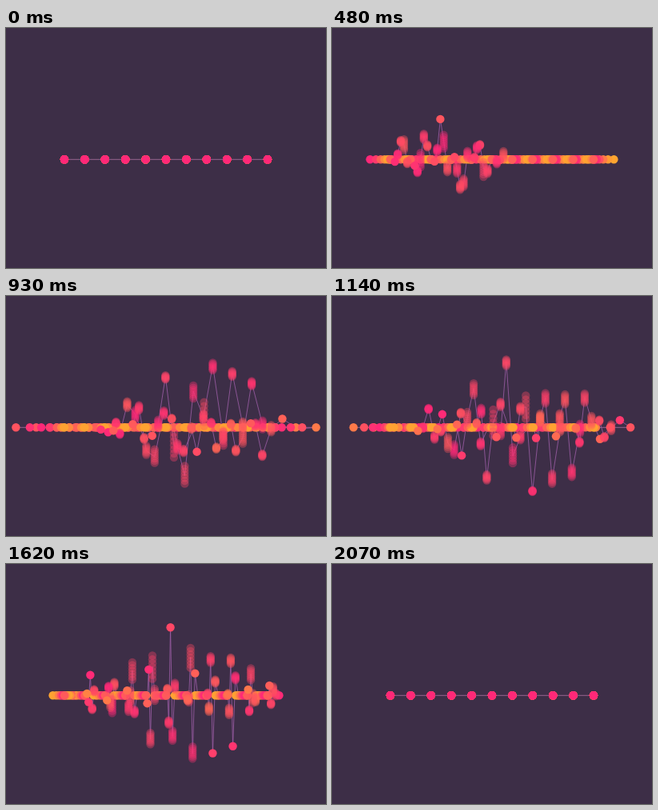
An HTML page with a canvas for the animation above (2.13 s loop, 400 by 300 pixels).

```html
<!DOCTYPE html>
<html lang="en">
<head>
<meta charset="utf-8">
<title>Dot string</title>
<style>
html, body { margin: 0; width: 100%; height: 100%; overflow: hidden; background: #3d2e47; }
canvas { display: block; width: 400px; height: 300px; }
</style>
</head>
<body>
<canvas id="stage" width="400" height="300"></canvas>
<script>
const ctx = document.getElementById("stage").getContext("2d");
const LOOP = 2130, STEP = 30, END = 2070, PEAK = 924;
const MID = 200, AXIS = 164.3, R = 5.2, GAP = 25.4;
const GROUPS = 11, FAN = 7, SWING = 95;
const TAU = Math.PI * 2;

const clamp = (v, a = 0, b = 1) => Math.min(b, Math.max(a, v));
const mix = (a, b, k) => a + (b - a) * k;
const hash = n => {
  const v = Math.sin(n * 127.1 + 31.7) * 43758.5453;
  return v - Math.floor(v);
};
const tint = c => `rgb(255,${Math.round(mix(40, 165, c))},${Math.round(mix(120, 48, c))})`;

function dot(x, y, color) {
  ctx.fillStyle = color;
  ctx.beginPath();
  ctx.arc(x, y, R, 0, TAU);
  ctx.fill();
}

function path(points) {
  ctx.beginPath();
  for (const [x, y] of points) ctx.lineTo(x, y);
  ctx.stroke();
}

// How far the outermost dots of a group have slid from rest.
function reach(t) {
  const lin = 61 - (t < PEAK ? 0.081 : 0.069) * Math.abs(t - PEAK);
  return 8 * Math.log(1 + Math.exp(lin / 8)) * clamp(t / 200) * clamp((END - t) / 200);
}

// Dots fan out to both sides of their group; k runs from -FAN to FAN.
function placeX(n, k, t) {
  const along = n / (GROUPS - 1);
  const power = mix(1.2, 2.2, k < 0 ? 1 - along : along);
  const slide = Math.sign(k) * Math.abs(k / FAN) ** power;
  return MID + (n - (GROUPS - 1) / 2) * GAP + slide * reach(t);
}

// Share of the swing: a front sweeps in from the left and then widens.
function activity(n, k, t) {
  if (k <= 0) return 0;
  const center = clamp(2 + (t - 480) / 70, 1, 5.4);
  const width = mix(3.2, 5.4, clamp((t - 480) / 660));
  const along = clamp(1 - ((n - center) / width) ** 2);
  const across = Math.sin(Math.PI * (k / FAN) ** 1.6) ** 2;
  return along * across;
}

function placeY(n, k, t) {
  const size = SWING * clamp((t - 60) / 600) * clamp((1980 - t) / 250);
  const own = mix(0.55, 1, hash(n * 31 + k));
  const phase = hash(n + 5) * TAU + k * (0.3 + 3 * t / END);
  return AXIS + size * own * activity(n, k, t) * Math.sin(t / 150 + phase);
}

// A dot smeared along its vertical path during one step.
function smear(n, k, t, color) {
  const x = placeX(n, k, t);
  const a = placeY(n, k, t - STEP / 2), b = placeY(n, k, t + STEP / 2);
  if (Math.abs(a - b) < 2) return dot(x, placeY(n, k, t), color);
  ctx.globalAlpha = 0.36;
  for (let i = 0; i < 7; i++) dot(x, mix(a, b, i / 6), color);
  ctx.globalAlpha = 1;
}

function colorOf(n, k, t) {
  const wave = 0.5 - 0.5 * Math.cos(TAU * t / END - 1.5 * Math.PI * k / FAN);
  const warm = hash(n * 13 + k * 7) * 0.5;
  return tint(mix(wave, warm, clamp(activity(n, k, t) * 5)));
}

function eachDot(draw) {
  for (let k = FAN; k >= 0; k--) {
    for (let n = 0; n < GROUPS; n++) {
      if (k) draw(n, -k);
      draw(n, k);
    }
  }
}

function draw(t) {
  ctx.fillStyle = "#3d2e47";
  ctx.fillRect(0, 0, 400, 300);
  ctx.lineWidth = 1;
  ctx.strokeStyle = "#96648f";
  path([[placeX(0, -FAN, t), AXIS], [placeX(GROUPS - 1, FAN, t), AXIS]]);

  ctx.strokeStyle = "rgba(158,94,168,0.8)";
  for (let n = 0; n < GROUPS; n++) {
    const thread = [];
    for (let k = 0; k <= FAN; k++) thread.push([placeX(n, k, t), placeY(n, k, t)]);
    path(thread);
  }

  const swings = (n, k) => activity(n, k, t) > 0.05;
  eachDot((n, k) => swings(n, k) || dot(placeX(n, k, t), AXIS, colorOf(n, k, t)));
  eachDot((n, k) => swings(n, k) && smear(n, k, t, colorOf(n, k, t)));
  if (t === 0 || t >= END) {
    for (let n = 0; n < GROUPS; n++) dot(placeX(n, 0, t), AXIS, tint(0));
  }
}

const start = performance.now();
function tick() {
  const t = (performance.now() - start) % LOOP;
  draw(Math.min(END, Math.floor(t / STEP) * STEP));
  requestAnimationFrame(tick);
}
tick();
</script>
</body>
</html>
```
